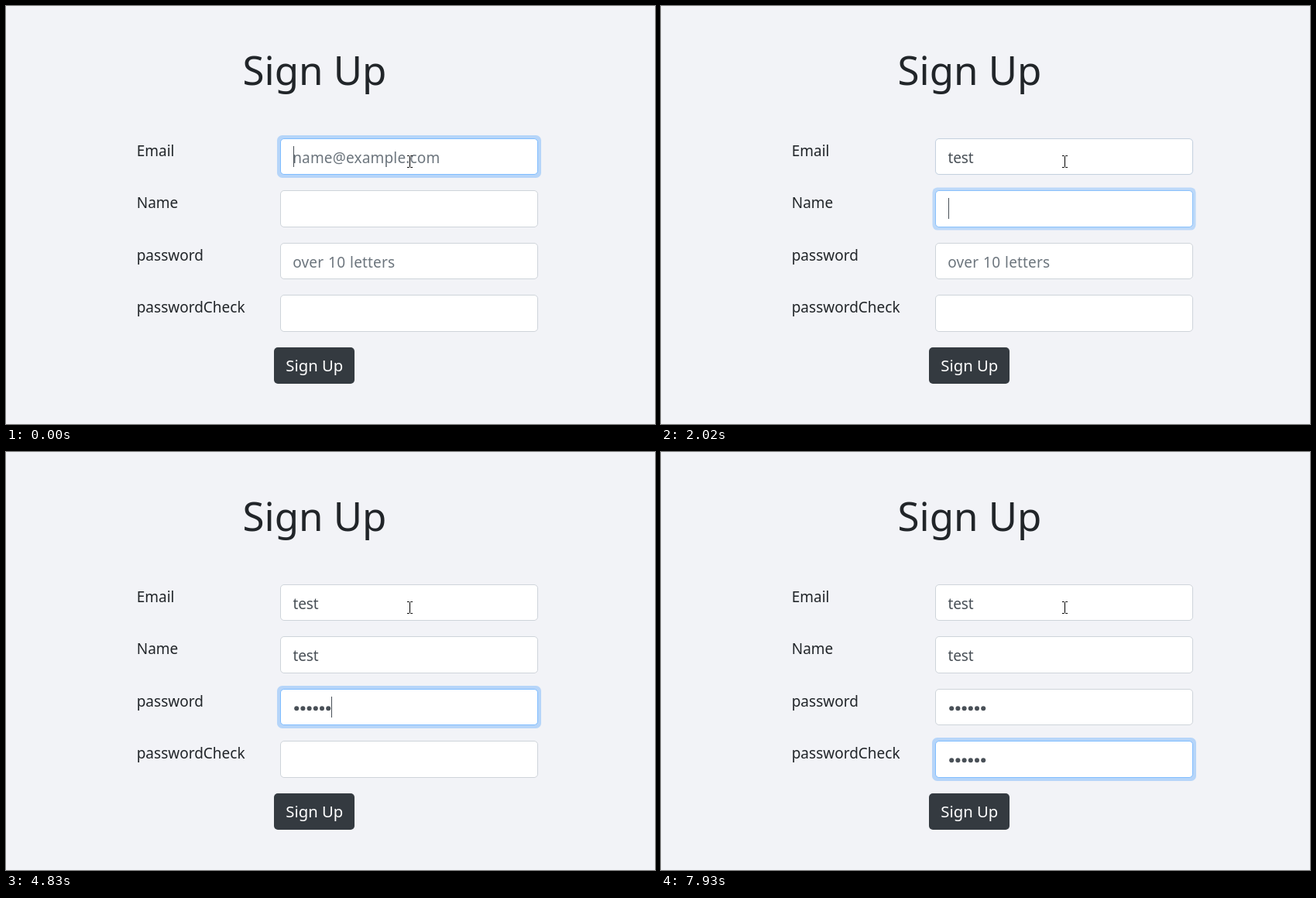
An HTML page that plays this animation: 838 by 540 pixels, repeating every 8000 ms.

```html
<!DOCTYPE html>
<html lang="en">
<head>
<meta charset="utf-8">
<title>Sign Up</title>
<style>
  html, body { margin: 0; width: 100%; height: 100%; overflow: hidden; background: #f2f3f7; }
  svg { display: block; }
  text { font: 400 19px "Noto Sans", "Open Sans", sans-serif; fill: #212529; }
  .title { font-size: 51px; text-anchor: middle; }
  .button { font-size: 20.3px; font-weight: 500; fill: #fff; }
  .hint { fill: #6c757d; letter-spacing: .17px; word-spacing: .8px; }
  .value { fill: #495057; letter-spacing: -.2px; }
  .dot, #caret { fill: #495057; }
  .ring { fill: #007bff; }
  .box { fill: #fff; }
</style>
</head>
<body>
<svg id="stage" width="838" height="540" viewBox="0 0 838 540">
  <text class="title" x="398.5" y="102">Sign Up</text>
  <g id="form"></g>
  <rect x="346" y="441" width="104" height="47" rx="5" fill="#343a40"/>
  <text class="button" x="361.3" y="472">Sign Up</text>
  <rect id="caret" width="1" height="27"/>
  <path d="M518 193.5h2.5l1 1l1-1h2.5M521.5 194.5v13M518 208.5h2.5l1-1l1 1h2.5" fill="none" stroke="#000"/>
</svg>
<script>
const LOOP = 8000;
const WORD = "test";
const WORD_CARETS = [371, 377, 388, 396, 403];
const DOT_PITCH = 8.2;

const fields = [
  { label: "Email", top: 171, height: 47, hint: "name@example.com" },
  { label: "Name", top: 238, height: 48, hint: "" },
  { label: "password", top: 306, height: 47, hint: "over 10 letters", secret: true },
  { label: "passwordCheck", top: 373, height: 48, hint: "", secret: true }
];

// Times at which each field receives its next character
const keys = [
  [700, 1080, 1310, 1480],
  [2480, 2800, 2970, 3120],
  [4210, 4280, 4450, 4680, 4750, 4830],
  [6760, 6840, 6990, 7160, 7220, 7390]
];

// Focus progress into each field: [time, amount]
const focusSteps = [
  [[0, 1]],
  [[1950, .15], [2020, .88], [2100, 1]],
  [[3350, .02], [3440, .75], [3500, 1]],
  [[6300, .22], [6380, .88], [6450, 1]]
];

const caretHidden = [[240, 700], [3900, 4210], [5380, 5930], [7930, 8000]];

const form = document.getElementById("form");
const caret = document.getElementById("caret");

function add(tag, attrs, text = "") {
  const el = document.createElementNS("http://www.w3.org/2000/svg", tag);
  set(el, attrs);
  el.textContent = text;
  return form.appendChild(el);
}

function set(el, attrs) {
  for (const name in attrs) el.setAttribute(name, attrs[name]);
}

for (const f of fields) {
  add("text", { x: 168.7, y: f.top + 23 }, f.label);
  f.ring = add("rect", { class: "ring" });
  f.box = add("rect", { class: "box", x: 354.5, y: f.top + .5, width: 332, height: f.height - 1, rx: 4.5 });
  f.hintText = add("text", { class: "hint", x: 370.2, y: f.top + 32 }, f.hint);
  if (f.secret) {
    f.dots = Array.from({ length: 6 }, (_, i) =>
      add("circle", { class: "dot", cx: 375.2 + i * DOT_PITCH, cy: f.top + 25.3, r: 3 }));
  } else {
    f.value = add("text", { class: "value", x: 370.6, y: f.top + 32 });
  }
}

const mix = (a, b, k) => Math.round(a + (b - a) * k);

function drawFocus(f, k) {
  const spread = 4 * k;
  set(f.ring, {
    x: 354 - spread, y: f.top - spread,
    width: 333 + 2 * spread, height: f.height + 2 * spread,
    rx: 5 + spread * .4, "fill-opacity": .25 * k
  });
  f.box.setAttribute("stroke", `rgb(${mix(206, 128, k)},${mix(212, 189, k)},${mix(218, 255, k)})`);
}

function draw(t) {
  const levels = focusSteps.map(steps =>
    steps.reduce((k, [at, amount]) => t >= at ? amount : k, 0));
  let active = 0;

  fields.forEach((f, i) => {
    if (levels[i] > 0) active = i;
    drawFocus(f, Math.max(0, levels[i] - (levels[i + 1] || 0)));
    f.count = keys[i].filter(at => t >= at).length;
    f.hintText.setAttribute("visibility", f.count ? "hidden" : "visible");
    if (f.secret) {
      f.dots.forEach((dot, n) => dot.setAttribute("visibility", n < f.count ? "visible" : "hidden"));
    } else {
      f.value.textContent = WORD.slice(0, f.count);
    }
  });

  const f = fields[active];
  set(caret, {
    x: f.secret ? Math.floor(371.2 + f.count * DOT_PITCH) : WORD_CARETS[f.count],
    y: f.top + 10,
    visibility: caretHidden.some(([from, to]) => t >= from && t < to) ? "hidden" : "visible"
  });
}

const start = performance.now();
function tick() {
  draw((performance.now() - start) % LOOP);
  requestAnimationFrame(tick);
}
tick();
</script>
</body>
</html>
```
